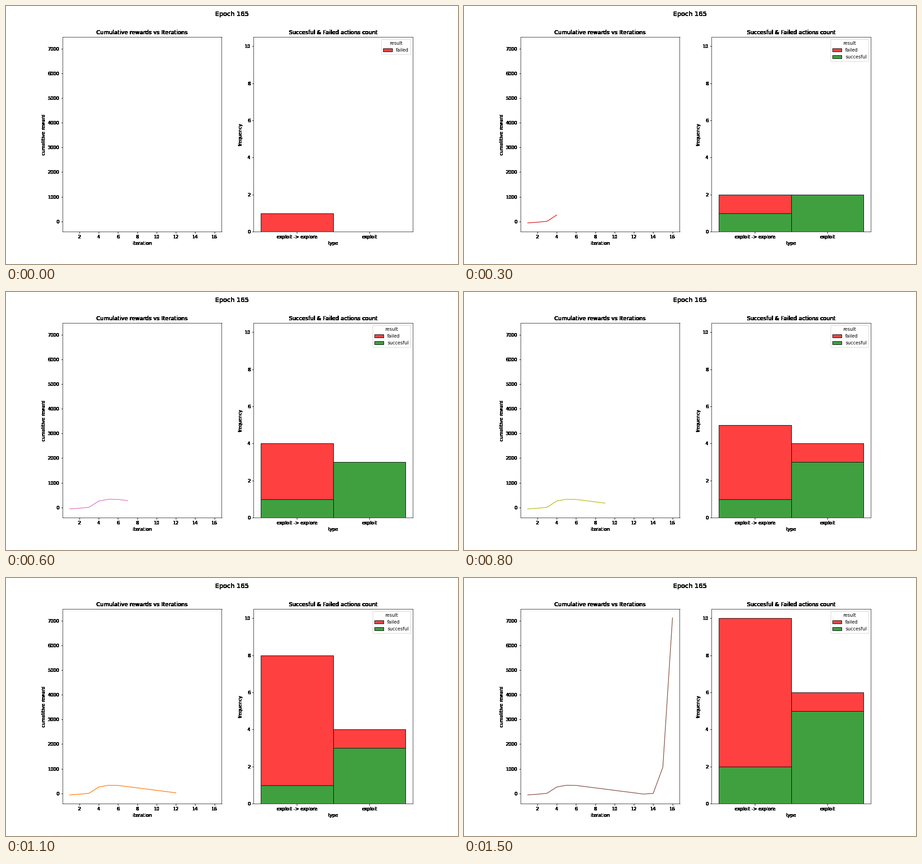
A matplotlib script for the animation above (1.6 s loop, 990 px wide and 566 px high).

```python
import numpy as np
import matplotlib.pyplot as plt
from matplotlib.animation import FuncAnimation
from matplotlib.patches import Patch

DPI = 72
STEPS = 16

KINDS = ["exploit -> explore", "exploit"]
FILLS = {"failed": (1, 0, 0, 0.75), "succesful": (0, 0.5, 0, 0.75)}

# Running reward after each iteration.
totals = [-55, -28, 10, 263, 335, 329]
totals += [329 - 50 * k for k in range(1, 8)] + [5, 1067, 7115]

# One action per iteration: kind index and success.
actions = [(0, False), (0, True), (1, True), (1, True), (1, True), (0, False),
           (0, False), (1, False), (0, False), (0, False), (0, False),
           (0, False), (0, False), (0, True), (1, True), (1, True)]

plt.rcParams.update({
    "font.family": "DejaVu Sans",
    "xtick.major.width": 1,
    "ytick.major.width": 1,
})

# The tiny surplus keeps the pixel height from being rounded down.
fig, (left, right) = plt.subplots(
    1, 2, figsize=(990 / DPI, 566.001 / DPI), dpi=DPI)
fig.subplots_adjust(left=0.125, right=0.9, bottom=0.125, top=0.88, wspace=0.2)
title = fig.suptitle("Epoch 165", fontsize=14)

left.set(title="Cumulative rewards vs Iterations", xlabel="iteration",
         ylabel="cumalitive reward", xlim=(0.25, 16.75), ylim=(-413.5, 7473.5),
         xticks=range(2, 17, 2), yticks=range(0, 7001, 1000))
right.set(title="Succesful & Failed actions count", xlabel="type",
          ylabel="frequency", xlim=(-0.6, 1.6), ylim=(0, 10.5),
          yticks=range(0, 11, 2))
right.set_xticks([0, 1], KINDS)

line, = left.plot([], [])


def solid(image, dpi):
    """Turn every touched pixel into opaque black."""
    ink = np.zeros_like(image)
    ink[..., 3] = image[..., 3] > 0
    return ink, 0, 0


def harden_text():
    """Give all text outside the plots hard edges."""
    labels = [title]
    for ax in (left, right):
        labels += [ax.title, ax.xaxis.label, ax.yaxis.label]
        labels += ax.get_xticklabels() + ax.get_yticklabels()
    for label in labels:
        label.set_agg_filter(solid)


def count(done, kind, success):
    return actions[:done].count((kind, success))


def draw_bars(done):
    for bars in list(right.containers):
        bars.remove()
    for kind in range(len(KINDS)):
        good, bad = count(done, kind, True), count(done, kind, False)
        for name, height, base in (("failed", bad, good), ("succesful", good, 0)):
            if height:
                right.bar(kind, height, 1, bottom=base, color=FILLS[name],
                          edgecolor="black", linewidth=1)
    right.set(xlim=(-0.6, 1.6), ylim=(0, 10.5))


def draw_legend(done):
    names = ["failed"]
    if any(success for _, success in actions[:done]):
        names.append("succesful")
    keys = [Patch(facecolor=FILLS[n], edgecolor="black", linewidth=1) for n in names]
    right.legend(keys, names, title="result", loc="upper right")


def update(i):
    done = i + 1
    line.set_data(range(1, done + 1), totals[:done])
    line.set_color(f"C{i % 10}")
    draw_bars(done)
    draw_legend(done)
    return []


harden_text()
anim = FuncAnimation(fig, update, frames=STEPS, interval=100,
                     init_func=lambda: [], repeat=True, repeat_delay=0)
plt.show()
```
